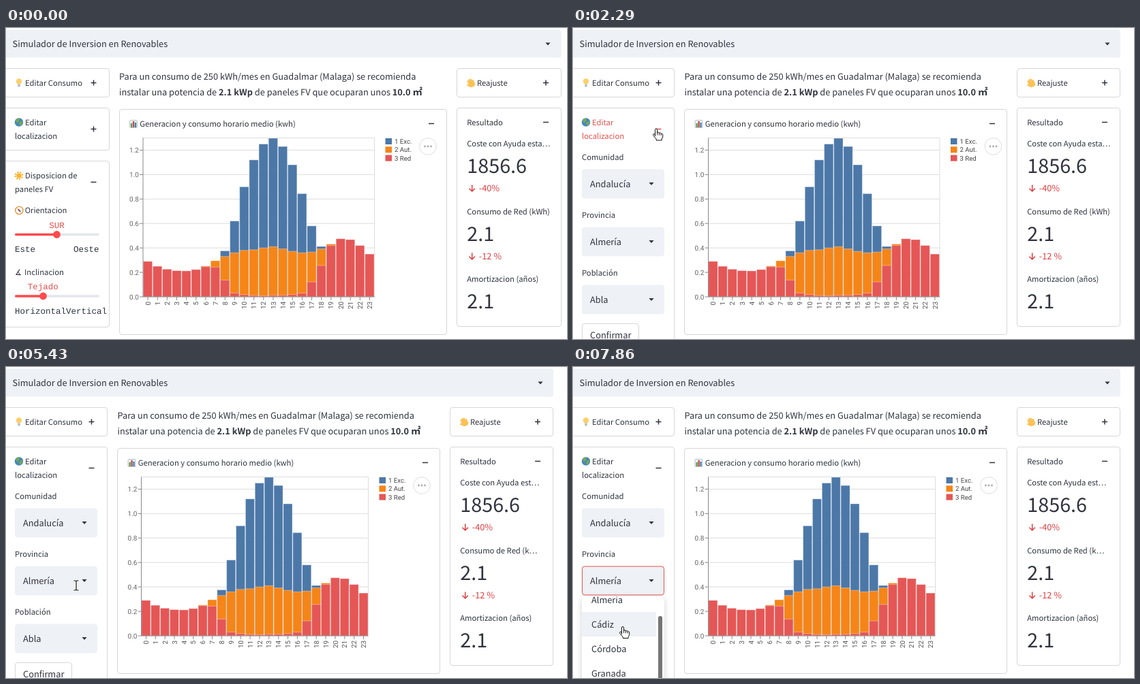
Animation of 823x457 px, one loop 8 s. Source, as an HTML page:

```html
<!DOCTYPE html>
<html lang="es">
<head>
<meta charset="utf-8">
<title>Simulador</title>
<style>
html, body { margin: 0; width: 100%; height: 100%; overflow: hidden; background: #fff; }
svg { display: block; width: 823px; height: 457px; }
text {
  font-family: "Noto Sans CJK JP", "Noto Sans CJK SC", "Noto Sans CJK KR", "Noto Sans CJK TC", sans-serif;
  text-rendering: geometricPrecision;
  white-space: pre;
}
.mono { font-family: "Liberation Mono", monospace; }
.plot { font-family: Roboto, "Open Sans", sans-serif; }
.sym { font-family: "DejaVu Sans", sans-serif; }
.list { filter: drop-shadow(0 3px 5px rgba(0, 0, 0, .18)); }
</style>
</head>
<body>
<svg id="stage" viewBox="0 0 823 457"></svg>
<script>
const LOOP = 8000, FPS = 7;
const INK = '#31333f', RED = '#e2504d', GREY = '#eef1f5', PRIMARY = '#ff4b4b';
const SMALL = 11.25, BODY = 12.8, BIG = 28.8;

// Hourly energy: grid share, running total with own use, running total with surplus
const grid = [.29, .25, .226, .214, .212, .223, .246, .243, .137, .031, .018, .011, .009, .012, .013,
  .018, .03, .122, .256, .42, .475, .468, .42, .35];
const own = { 6: .252, 7: .295, 8: .33, 9: .36, 10: .38, 11: .385, 12: .4, 13: .41, 14: .392, 15: .372,
  16: .36, 17: .366, 18: .392, 19: .432 };
const extra = { 8: .376, 9: .62, 10: .9, 11: 1.12, 12: 1.25, 13: 1.297, 14: 1.23, 15: 1.08, 16: .844,
  17: .58, 18: .412 };

// Pointer path: tick, x, y
const path = [[7, 132, 33], [9, 126, 108], [10, 123, 136], [11, 122, 148], [19, 122, 148],
  [20, 120, 160], [21, 115, 194], [22, 112, 220], [26, 113, 230], [28, 113, 230],
  [36, 103, 326], [37, 103, 326], [38, 103, 321], [42, 103, 321],
  [46, 73, 355], [47, 90, 384], [49, 121, 367], [50, 121, 372], [52, 104, 386], [55, 73, 381.5]];

function pointerAt(n) {
  if (n < path[0][0]) return null;
  const i = path.findIndex(k => k[0] >= n);
  if (i < 1) return path[i < 0 ? path.length - 1 : 0].slice(1);
  const [t0, x0, y0] = path[i - 1], [t1, x1, y1] = path[i];
  const u = (n - t0) / (t1 - t0);
  return [x0 + (x1 - x0) * u, y0 + (y1 - y0) * u];
}

const within = (v, a, b) => v >= a && v <= b;

// Text is placed by the middle of its capitals, on a whole-pixel baseline
const text = (x, cy, s, size = SMALL, fill = INK, attrs = '') =>
  `<text x="${x}" y="${Math.round(cy + size * .367)}" font-size="${size}" fill="${fill}" ${attrs}>${s}</text>`;
const mono = (x, cy, s, fill = INK, anchor = 'start') =>
  text(x, cy, s, 12.5, fill, `class="mono" text-anchor="${anchor}"`);
const rect = (x, y, w, h, fill, rx = 0, attrs = '') =>
  `<rect x="${x}" y="${y}" width="${w}" height="${h}" fill="${fill}" rx="${rx}" ${attrs}/>`;
const circle = (x, y, r, fill, attrs = '') => `<circle cx="${x}" cy="${y}" r="${r}" fill="${fill}" ${attrs}/>`;
const line = (d, stroke, w = 1, attrs = '') => `<path d="${d}" fill="none" stroke="${stroke}" stroke-width="${w}" ${attrs}/>`;
const fill = (d, color) => `<path d="${d}" fill="${color}"/>`;
const card = (x, y, w, h) => rect(x, y, w, h, '#fff', 3.6, 'stroke="#d6d6d9"');
const minus = (x, y, c = INK) => line(`M${x - 4} ${y}h8`, c, 1.5);
const plus = (x, y, c = INK) => minus(x, y, c) + line(`M${x} ${y - 4}v8`, c, 1.5);
const caretDown = (x, y) => fill(`M${x - 3.6} ${y - 2}h7.2l-3.6 4z`, INK);
const group = (x, y, s) => `<g transform="translate(${x} ${y})">${s}</g>`;

const icons = {
  bulb: circle(0, -2, 4.2, '#fcd06a') + rect(-1.8, 2, 3.6, 4, '#b4bec6', 1),
  globe: circle(0, 0, 6.2, '#4389bd') + fill('M-5-3Q-2-7 1-5L0-1-3 1zM0 1l4-3 1.5 2L3 5 1 4z', '#78a850'),
  sun: circle(0, 0, 3.8, '#fdb52f') + line('M-5.3 0a5.3 5.3 0 1 0 10.6 0a5.3 5.3 0 1 0-10.6 0', '#f5a623', 1.8, 'stroke-dasharray="2 2.16"'),
  compass: circle(0, 0, 5.6, '#fff', 'stroke="#e2942f" stroke-width="1.4"') + fill('M-3-3L1-1-1 1z', '#d8453e') + fill('M3 3L1-1-1 1z', '#567'),
  bars: rect(-5.5, -5.5, 11, 11, '#eef3f6', 1, 'stroke="#b5c3cc"') + rect(-4, -1, 2.3, 6, '#5d9c47') + rect(-1.1, -4, 2.3, 9, '#c9483f') + rect(1.9, -2, 2.3, 7, '#3f7fb8'),
  wave: `<g transform="rotate(-25) scale(1.1)">${line('M-2.6 0v-4M-.4 0v-5M1.8 0v-4.6M3.8 2v-4M-2.5 3l-2.6-2.4', '#fbc155', 2.1, 'stroke-linecap="round"')}${rect(-3.6, -1.5, 8.3, 7, '#fbc155', 3)}</g>`
};
const icon = (name, x, y) => group(x, y, icons[name]);

const shapes = {
  hand: `<path d="M-1.5 11V1.5a1.5 1.5 0 0 1 3 0V6.5a1.4 1.4 0 0 1 2.8 0v.8a1.4 1.4 0 0 1 2.8 0v.8a1.4 1.4 0 0 1 2.6 0v4l-1.5 3v1.9h-8v-1.8l-4.5-5.4a1.4 1.4 0 0 1 2.3-1.6z" fill="#fff" stroke="#111" stroke-linejoin="round"/>`
    + line('M1.5 6.5v3M4.3 7.3v2.5M7.1 8v2', '#111', .9),
  arrow: '<path d="M0 0V14L3.4 11 5.6 16 7.9 15 5.7 10.2H10z" fill="#fff" stroke="#111"/>',
  beam: ['#fff', '#111'].map((c, i) => line('M-3.5-7h2.3L0-6 1.2-7h2.3M0-6V6M-3.5 7h2.3L0 6 1.2 7h2.3', c, i ? 1.2 : 3)).join('')
};

function pointer(n, x, y) {
  let kind = 'arrow';
  if (within(y, 59, 102) || within(y, 117, 179) || within(y, 207, 249)) kind = 'hand';
  else if (within(y, 292, 334)) kind = 'beam';
  else if (n > 40 && y > 342 && x < 119) kind = 'hand';
  return group(x, y, shapes[kind]);
}

function chart(x0, w, shift) {
  const base = 395, unit = 179.6, step = w / 24;
  const Y = v => base - v * unit;
  let s = line(`M${x0} 161.5h${w}V${base}`, '#ddd');
  for (let i = 0; i < 7; i++) {
    const y = Y(i * .2);
    s += line(`M${x0} ${y}h${w}`, '#ddd') + line(`M${x0 - 5} ${y}h5`, '#888')
      + text(x0 - 6, y, (i * .2).toFixed(1), 10, '#666', 'class="plot" text-anchor="end"');
  }
  for (let h = 0; h < 24; h++) {
    const x = x0 + h * step + .3;
    const layer = (v, c) => v ? rect(x, Y(v), step - .8, v * unit, c, 0, 'stroke="#fff" stroke-opacity=".35"') : '';
    s += layer(extra[h], '#4c78a8') + layer(own[h], '#f58518') + layer(grid[h], '#e45756');
    const cx = x0 + (h + .5) * step;
    s += line(`M${cx} ${base}v5`, '#888')
      + `<text class="plot" transform="translate(${cx + 3.6} 401.8) rotate(-90)" text-anchor="end" font-size="10" fill="#555">${h}</text>`;
  }
  s += line(`M${x0} 161.5V${base}h${w}`, '#888');
  const lx = 556.5 + shift;
  [['1 Exc.', '#4c78a8'], ['2 Aut.', '#f58518'], ['3 Red', '#e45756']].forEach(([name, c], i) => {
    const y = 166.5 + i * 12.3;
    s += rect(lx, y - 4.5, 9.5, 9, c) + text(lx + 13.5, y, name, 9.6, '#444', 'class="plot"');
  });
  const cx = 619 + shift;
  s += circle(cx, 174, 12.3, '#fff', 'stroke="#ddd"');
  for (const d of [-4.5, 0, 4.5]) s += circle(cx + d, 174, 1.4, '#aaa');
  return s;
}

const slider = (y, x) => rect(13, y - 1.8, 124, 3.6, '#e4e6eb', 1.8)
  + rect(13, y - 1.8, x - 13, 3.6, PRIMARY, 1.8) + circle(x, y, 5.4, PRIMARY);

function panelsCard() {
  return card(-6, 195.5, 157.5, 244) + icon('sun', 19, 217)
    + text(28, 217, 'Disposicion de') + text(13, 237, 'paneles FV') + minus(128.5, 226.5)
    + icon('compass', 19.4, 268) + text(27.7, 268, 'Orientacion')
    + mono(74.5, 289, 'SUR', RED, 'middle') + slider(303.5, 74.5)
    + mono(13, 324, 'Este') + mono(136.5, 324, 'Oeste', INK, 'end')
    + text(13, 359, '∡', 11.5, INK, 'class="sym"') + text(27, 359, 'Inclinacion')
    + mono(54.2, 379, 'Tejado', RED, 'middle') + slider(394, 54.5)
    + mono(13, 415, 'HorizontalVertical');
}

const select = (y, label, value, focus) => text(13, y - 39, label)
  + rect(13.5, y - 21, 120, 42, GREY, 3.6, `stroke="${focus ? RED : GREY}"`)
  + text(25, y, value, BODY) + caretDown(115, y);

function placeForm(n) {
  const focus = n >= 40;
  const caret = within(n, 40, 42) || within(n, 46, 49);
  return select(229, 'Comunidad', 'Andalucía') + select(314, 'Provincia', 'Almería', focus)
    + select(399, 'Población', 'Abla')
    + card(13.5, 434.5, 83, 34) + text(25, 451, 'Confirmar', BODY)
    + (caret ? line('M73.5 305.5v17', '#111') : '');
}

function options(n) {
  if (n < 40) return '';
  const s = Math.min(1, Math.max(0, (n - 48) / 2)), current = n < 47 ? 0 : 1;
  const rows = ['Almería', 'Cádiz', 'Córdoba', 'Granada'].map((name, i) => {
    const y = 342 + i * 36 - 18 * s;
    return (i === current ? rect(13, y, 109, 36, GREY) : '') + text(27, y + 18, name, BODY);
  }).join('');
  return `<g opacity="${n < 41 ? .6 : 1}">${rect(13, 337.5, 121, 150, '#fff', 3, 'class="list"')}`
    + `<clipPath id="view"><rect x="13" y="337.5" width="121" height="120"/></clipPath><g clip-path="url(#view)">${rows}</g>`
    + rect(125, 345 + 21 * s, 6, 140, '#757575', 2.5) + '</g>';
}

function leftColumn(n, wide, at) {
  const edge = wide ? 151.5 : 148.5, mark = edge - 23, y = at ? at[1] : -1;
  const c1 = within(y, 59, 102) ? RED : INK, c2 = within(y, 117, 179) ? RED : INK;
  return card(-6, 59.5, edge + 6, 42) + icon('bulb', 19, 80.5) + text(28, 81, 'Editar Consumo', SMALL, c1) + plus(mark, 80.5, c1)
    + card(-6, 117.5, edge + 6, wide ? 62 : 400) + icon('globe', 19, 138.5)
    + text(28, 139, 'Editar', SMALL, c2) + text(13, 159, 'localizacion', SMALL, c2)
    + (wide ? plus : minus)(mark, 148.5, c2)
    + (wide ? panelsCard() : placeForm(n));
}

function middleColumn(n, wide) {
  const x = wide ? 166 : 163.5, fitted = n >= 18;
  const bold = s => `<tspan font-weight="700">${s}</tspan>`;
  return text(x, 71.5, 'Para un consumo de 250 kWh/mes en Guadalmar (Malaga) se recomienda', BODY)
    + text(x, 94.5, `instalar una potencia de ${bold('2.1 kWp')} de paneles FV que ocuparan unos ${bold('10.0 <tspan font-size="14.4">㎡</tspan>')}`, BODY)
    + card(wide ? 166.5 : 163.5, 119.5, wide ? 480 : 473, 331)
    + icon('bars', x + 21, 141) + text(x + 30.3, 141, 'Generacion y consumo horario medio (kwh)')
    + minus(wide ? 624 : 615, 140.5)
    + chart(wide ? 201 : 198.5, fitted ? 333 : 339.5, fitted ? -9 : wide ? 0 : -2.5);
}

function rightColumn(n, wide) {
  const x = wide ? 661.5 : 651.5, w = wide ? 153 : 151, tx = x + 14.7, mark = wide ? 792 : 780;
  const short = n >= 18;
  const metric = (y, label, value, delta) => text(tx, y, label) + text(tx, y + 32.3, value, BIG)
    + (delta ? text(tx + 17.5, y + 65.5, delta, BODY, '#e03c3e')
      + line(`M${tx + 7.5} ${y + 60.5}v9.5m-4.2-4.2l4.2 4.2 4.2-4.2`, '#e03c3e', 1.5) : '');
  return card(x, 59.5, w, 42) + icon('wave', x + 20.5, 81) + text(x + 29.5, 81, 'Reajuste') + plus(mark, 80.5)
    + card(x, 117.5, w, 321) + text(tx, 139, 'Resultado') + minus(mark, 138.5)
    + metric(170, `Coste con Ayuda est${short ? '' : 'a'}…`, '1856.6', '-40%')
    + metric(270, short ? 'Consumo de Red (k…' : 'Consumo de Red (kWh)', '2.1', '-12 %')
    + metric(369, 'Amortizacion (años)', '2.1');
}

function scene(n) {
  const wide = n < 16, at = pointerAt(n), end = wide ? 814.5 : 803;
  return rect(-6, 2.5, end + 6, 41, GREY, 3.6) + text(9.5, 23, 'Simulador de Inversion en Renovables', BODY)
    + caretDown(wide ? 795 : 784, 23.5)
    + leftColumn(n, wide, at) + middleColumn(n, wide) + rightColumn(n, wide)
    + options(n) + (at ? pointer(n, ...at) : '');
}

const stage = document.getElementById('stage');
let shown = -1;
function draw(now) {
  const n = Math.floor((now % LOOP + 5) * FPS / 1000);
  if (n !== shown) stage.innerHTML = scene(shown = n);
  requestAnimationFrame(draw);
}
draw(0);
</script>
</body>
</html>
```
